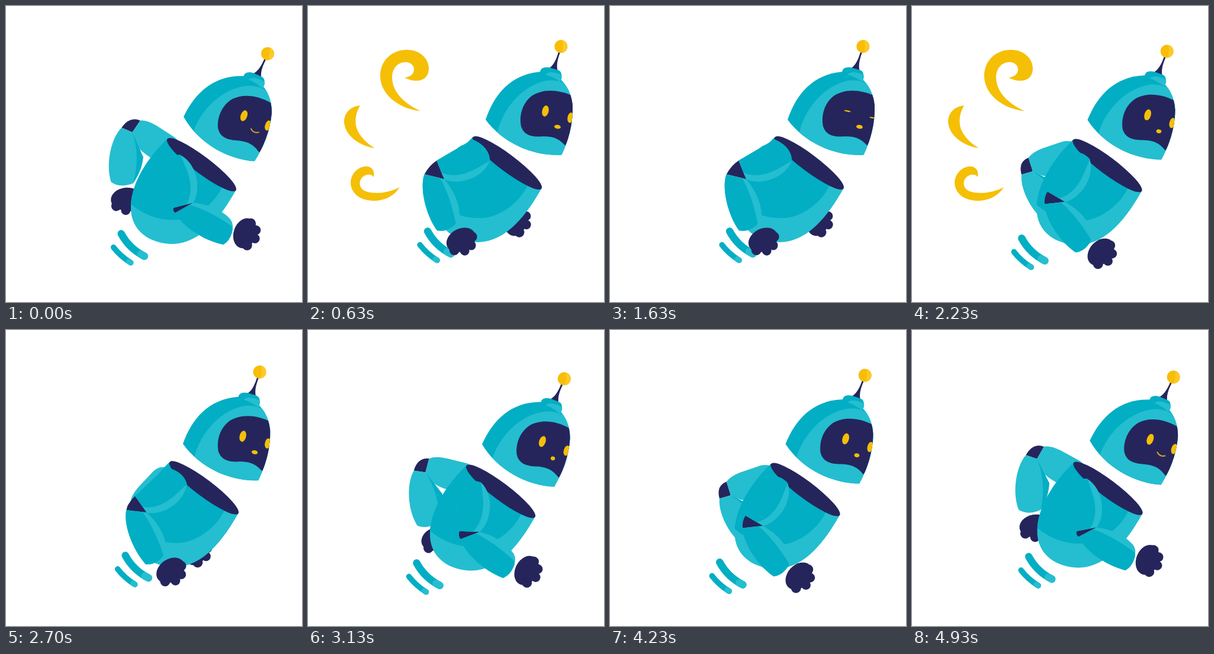
Write an HTML page that moves like this. It is 500 px wide and 500 px high and loops after 5.01 s.

```html
<!DOCTYPE html>
<html lang="en">
<head>
<meta charset="utf-8">
<title>Running robot</title>
<style>
  html, body { margin: 0; width: 100%; height: 100%; overflow: hidden; background: #fff; }
  svg { display: block; width: 100vw; height: 100vh; }
  .d { fill: #02aec4; }
  .l { fill: #24bed0; }
  .n { fill: #25255c; }
  .y { fill: #f5bf05; }
  .line { fill: none; stroke-linecap: round; }
</style>
</head>
<body>
<svg viewBox="0 0 500 500">
  <defs>
    <path id="torso" d="M272 224C250 245 212 290 211 338C210 380 245 401 282 401C330 400 365 352 388 311Z"/>
    <path id="skull" d="M300 187C320 145 352 117 400 118C432 121 449 148 449 180C446 213 434 240 420 262C375 259 325 232 300 187Z"/>
    <clipPath id="inTorso"><use href="#torso"/></clipPath>
    <clipPath id="inSkull"><use href="#skull"/></clipPath>
    <g id="hand" class="n">
      <ellipse rx="26" ry="19"/>
      <circle cx="19" cy="4" r="8.5"/>
      <circle cx="11" cy="16" r="8"/>
      <circle cx="-3" cy="19" r="8"/>
      <circle cx="-18" cy="10" r="8.5"/>
    </g>
  </defs>

  <g id="lines">
    <path class="line" stroke="#02aec4" stroke-width="12.500" d="M196 384.500Q209 409 235 422.500"/>
    <path class="line" stroke="#24bed0" stroke-width="12.500" d="M229 419.200L235 422.500"/>
    <path class="line" stroke="#02aec4" stroke-width="9.500" d="M183 407.500Q194 422 212 433.500"/>
    <path class="line" stroke="#24bed0" stroke-width="9.500" d="M209 431.500L212 433.500"/>
  </g>

  <g id="body">
    <use id="farHand" href="#hand"/>
    <path id="farJoint" class="n"/>
    <path id="farUpper" class="l" d="M18 10L-14 -9C-26 -10 -32 0 -32.500 12L-32 47Q-31 66 -24 75L0 75C18 60 20 45 18 10Z"/>
    <g id="farFore">
      <path class="l" d="M0 0L-19 -6C-36 15 -40 60 -28 87Q-12 96 9 86C18 70 22 55 22 40Z"/>
      <path class="d" d="M0 0Q18 40 9 86C18 70 22 55 22 40Z"/>
    </g>
    <use href="#torso" class="l"/>
    <path class="d" clip-path="url(#inTorso)" d="M272 222L366 303C352 335 318 358 290 360C258 362 230 352 205 328L205 240Z"/>
    <ellipse class="n" cx="330.500" cy="267" rx="72.500" ry="14.500" transform="rotate(36.900 330.500 267)"/>
    <path id="nearJoint" class="n"/>
    <g id="nearUpper">
      <path class="l" d="M-38 2C-24 -10 -8 -15 7 -8C18 4 22 22 19 39C16 57 8 69 0 75L-34 72Z"/>
      <path class="d" d="M-38 2C-24 -10 -8 -15 7 -8C8 10 10 26 7 40C4 56 -4 68 -12 74L-34 72Z"/>
    </g>
    <g id="nearFore">
      <path class="l" d="M0 0L-30 -17C-43 0 -47 46 -35 80Q-24 86 -10 82Q4 78 8 68C13 52 13 28 0 0Z"/>
      <path class="d" d="M-6 -3L-30 -17C-43 0 -47 46 -35 80Q-24 86 -10 82Q-2 80 -1 76Q2 30 -6 -3Z"/>
    </g>
    <use id="nearHand" href="#hand"/>
  </g>

  <g id="head">
    <path class="n" d="M417 114Q428 109 436.500 88L439.500 89Q429 108 431 120Z"/>
    <circle cx="441.700" cy="80" r="11" fill="#f8bd08"/>
    <path d="M444.700 69.500A11 11 0 0 1 441.700 91Q446.700 80 444.700 69.500Z" fill="#fdc926"/>
    <use href="#skull" class="d"/>
    <path class="l" clip-path="url(#inSkull)" d="M317 211C330 175 364 141 403 135C422 132 438 139 452 152L452 200L420 264C380 260 345 242 317 211Z"/>
    <path class="d" d="M401 124C400 112 408 110 418 113L432 119C438 122 438 130 433 139C425 132 412 127 401 124Z"/>
    <path class="l" d="M410 124C414 117 434 124 437 129Q437 134 433 139Q422 129 410 124Z"/>
    <g clip-path="url(#inSkull)">
      <path class="n" d="M452 166C425 149 400 148 382 157C364 168 357 188 358 205C361 222 375 226 392 227C412 229 420 236 428 247L452 215Z"/>
      <g transform="translate(402 185) rotate(20)"><ellipse class="y eye" rx="5.500" ry="9.500"/></g>
      <g transform="translate(442.500 201.500) rotate(17)"><ellipse class="y eye" rx="4.800" ry="8.800"/></g>
      <path id="smile" class="line" stroke="#d9a916" stroke-width="2" d="M414 207Q418 215 427 213"/>
      <ellipse id="mouth" class="y" transform="translate(419 214) rotate(16)" ry="3.300"/>
    </g>
  </g>

  <g id="puffs" class="y">
    <path d="M190 177.500C150 173 122 147 122 118C122 92 142 74 167 74C190 74 205 90 204 107C203 127 183 131 163 121C173 120 180 114 179 106C178 98 170 94 163 95C149 96 142 108 142 121C143 145 160 163 190 177.500Z"/>
    <path d="M88 168C70 170 61 182 61 196C62 219 88 237 113 240C97 231 81 214 80.500 197C80 185 83 177 88 168Z"/>
    <path d="M155 306C146 321 129 329 111 329C87 329 72 315 72 298C73 280 88 270 100 271C109 272 113 280 111 289C107 283 98 284 92 289C85 296 86 307 95 312C111 319 137 316 155 306Z"/>
  </g>
</svg>
<script>
const LOOP = 5010, CYCLE = 20;
const $ = id => document.getElementById(id);
const eyes = document.querySelectorAll('.eye');
const rad = deg => deg * Math.PI / 180;
const wave = (step, peak) => Math.cos((step - peak) / CYCLE * 2 * Math.PI);

// Each pair is a middle value and its swing.
const near = { name: 'near', x: 291, y: 260.6, upper: [-30, 50], fore: [33, 26.5],
  reach: [104.5, -3], back: [-34, 72], top: [-30, -17], bulge: 4 };
const far = { name: 'far', x: 276, y: 254, upper: [-67, 57], fore: [38, 43.5],
  reach: [114, 1], back: [-24, 75], top: [-19, -6], bulge: 14 };

// Angles are measured from straight down, positive towards the front.
function local([x, y], angle, ox, oy) {
  const s = Math.sin(rad(angle)), c = Math.cos(rad(angle));
  return [ox + x * c + y * s, oy - x * s + y * c];
}

function place(id, x, y, turn) {
  $(id).setAttribute('transform', `translate(${x.toFixed(2)} ${y.toFixed(2)}) rotate(${turn.toFixed(2)})`);
}

function poseArm(arm, swing) {
  const at = ([mid, amp]) => mid + amp * swing;
  const a = at(arm.upper), b = at(arm.fore);
  const elbow = local([0, 75], a, arm.x, arm.y);
  const hand = local([0, at(arm.reach)], b, ...elbow);
  const u = local(arm.back, a, arm.x, arm.y);
  const f = local(arm.top, b, ...elbow);
  const mx = (u[0] + f[0]) / 2, my = (u[1] + f[1]) / 2;
  const dx = mx - elbow[0], dy = my - elbow[1], len = Math.hypot(dx, dy) || 1;
  const q = [mx + dx / len * arm.bulge, my + dy / len * arm.bulge];
  place(arm.name + 'Upper', arm.x, arm.y, -a);
  place(arm.name + 'Fore', ...elbow, -b);
  place(arm.name + 'Hand', ...hand, -b - 12);
  $(arm.name + 'Joint').setAttribute('d', `M${elbow}L${u}Q${q} ${f}Z`);
}

// Extra lean towards the upper right around the loop seam.
function lean(step) {
  const d = Math.min(step, 100 - step);
  const v = Math.min(1, Math.max(0, (12 - d) / 10));
  return v * v * (3 - 2 * v);
}

function draw(ms) {
  const t = ms % LOOP;
  const step = Math.min(99, 2 * Math.floor(t / 100) + (t % 100 >= 30 ? 1 : 0));
  const e = lean(step), ex = 7.3 * e, ey = -6.2 * e;
  const bob = wave(step, 0.4), swing = wave(step, 0.3), drag = wave(step, 3);

  place('body', 0.5 - 8 * bob + ex, 1.75 + 5.5 * bob + ey, 0);
  place('lines', -3.2 - 9.3 * drag + ex, 2.5 + 6.5 * drag + ey, 0);
  poseArm(near, swing);
  poseArm(far, -swing);

  const hx = 297 - 4.4 * bob + ex, hy = 192.5 + 0.7 * bob + ey;
  const tilt = -4.3 + 4.1 * bob + 0.4 * e;
  $('head').setAttribute('transform', `translate(${hx} ${hy}) rotate(${tilt}) translate(-300 -187)`);

  const happy = e > 0.5;
  $('smile').style.display = happy ? '' : 'none';
  $('mouth').style.display = happy ? 'none' : '';
  $('mouth').setAttribute('rx', 4.6 - 1.3 * bob);

  const open = Math.min(1, 0.12 + Math.max(0, Math.abs(step - 33) - 1) * 0.44);
  eyes.forEach(eye => eye.setAttribute('transform', `scale(1 ${open})`));

  const puffing = step < 80 && step % 30 >= 10 && step % 30 < 20;
  $('puffs').style.display = puffing ? '' : 'none';
}

const start = performance.now();
function tick() {
  draw(performance.now() - start);
  requestAnimationFrame(tick);
}
tick();
</script>
</body>
</html>
```
